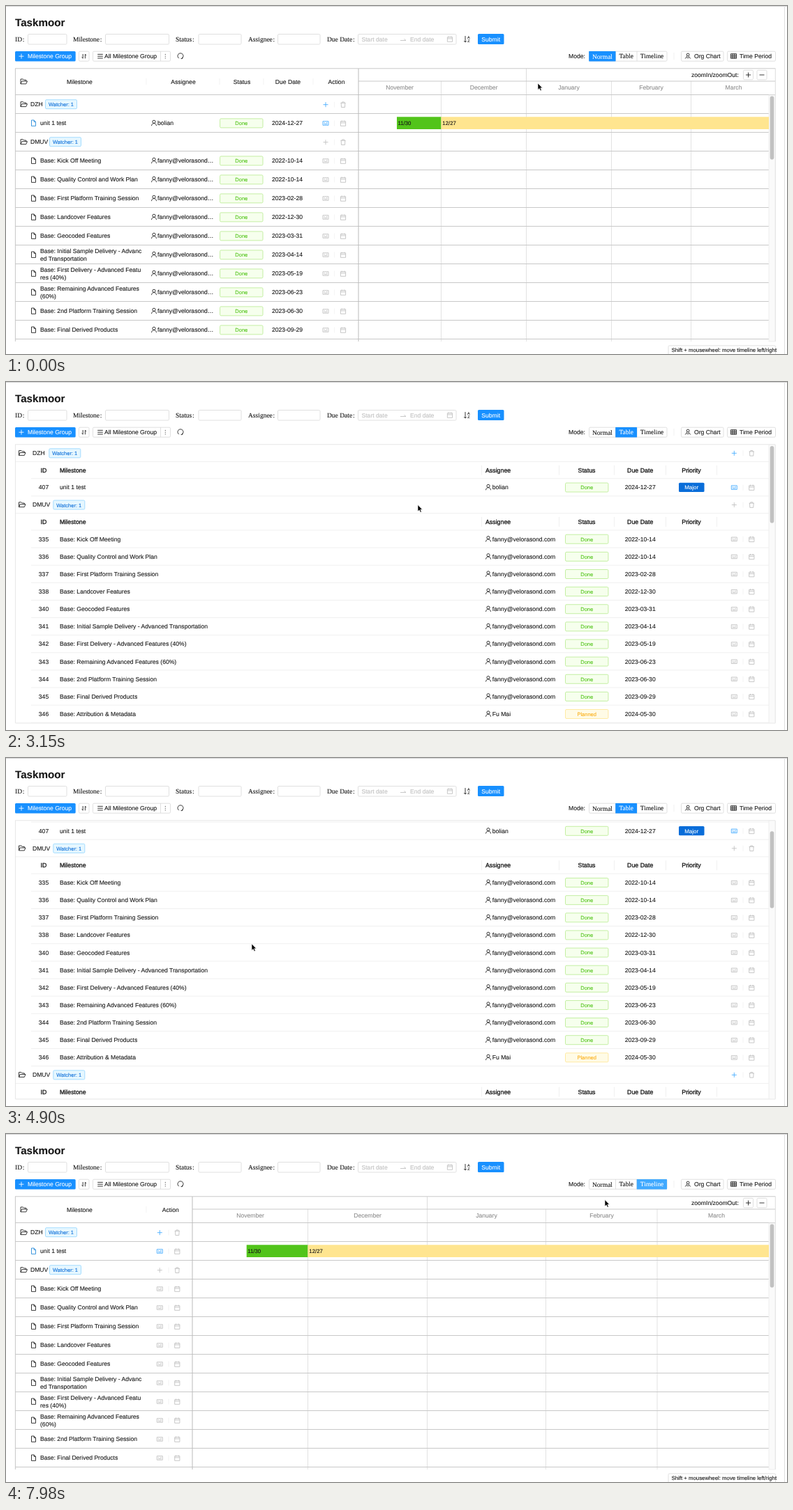
Recreate the animation shown at these times as an HTML page. Size 1119x500 px, loop 8 s.

```html
<!DOCTYPE html>
<html lang="en">
<head>
<meta charset="utf-8">
<title>Milestones</title>
<style>
html, body { margin: 0; width: 100%; height: 100%; overflow: hidden; background: #fff; }
svg { display: block; width: 1119px; height: 500px; font-family: "Liberation Sans", Arial, sans-serif; text-rendering: geometricPrecision; }
.serif { font-family: "Liberation Serif", "Times New Roman", serif; }
.icon { fill: none; stroke-width: .85; stroke-linejoin: round; }
</style>
</head>
<body>
<svg id="stage" viewBox="0 0 1119 500" xmlns="http://www.w3.org/2000/svg"></svg>
<script>
const LOOP = 8000, STEP = 70;
const INK = '#161616', GRAY = '#bfbfbf', BLUE = '#1890ff', SKY = '#40a9ff', RULE = '#c8c8c8', PALE = '#f0f0f0', BOX = '#d9d9d9';
const USER = 'bolian', MAIL = 'fanny@velorasond';

const ICONS = {
  user: 'M-2.1-1.9a2.1 2.1 0 1 0 4.2 0a2.1 2.1 0 1 0-4.2 0M-3.5 4C-3.2 1.6-1.8.4 0 .4S3.2 1.6 3.5 4',
  folder: 'M-4.5 3.4V-3.5H-1L.2-2.2H3.3V-.5M-4.5 3.4L-2.8-.5H5L3.3 3.4Z',
  file: 'M-3-4.2H.6L3-1.8V4.2H-3ZM.6-4.2V-1.8H3',
  plus: 'M-3.5 0H3.5M0-3.5V3.5',
  minus: 'M-3.5 0H3.5',
  trash: 'M-3.7-2.4H3.7M-1.5-2.4V-3.8H1.5V-2.4M-2.8-2.4L-2.5 3.8H2.5L2.8-2.4',
  card: 'M-4-2.8H4V2.8H-4ZM-2.5-.8H-1M.5-.8H2.5M-2.5 1.1H2.5',
  cal: 'M-3.6-2.8H3.6V3.8H-3.6ZM-3.6-.6H3.6M-1.8-4V-2M1.8-4V-2',
  sort: 'M-1.6-3.2V3L-3.3 1.3M1.6 3.2V-3L3.3-1.3',
  list: 'M-3.8-2.8H3.8M-3.8 0H3.8M-3.8 2.8H3.8',
  dots: 'M0-3.2V-2.2M0-.5V.5M0 2.2V3.2',
  reload: 'M-2.2 3.2A4 4 0 1 1 2.2 3.2M.6 3.6H2.6V1.7',
  grid: 'M-4-3.3H4V3.3H-4ZM-4-1H4M-4 1.2H4M-1.4-3.3V3.3M1.4-3.3V3.3',
  org: 'M-1.8-2a1.9 1.9 0 1 0 3.8 0a1.9 1.9 0 1 0-3.8 0M-3.8 3.6L-.8-.4M.8 0L3.8 3.6M-1.5 2.4H1.5',
  arrow: 'M-4 1.5H4L1.5-.6'
};

// y is the middle of the line; bold is the width of a thin outline
const text = (x, y, s, { size = 8.6, fill = INK, at = 'start', bold = .1, more = '' } = {}) =>
  `<text x="${x}" y="${y + size * .37}" font-size="${size}" fill="${fill}" stroke="${fill}" stroke-width="${bold}" text-anchor="${at}" ${more}>${s.replace(/&/g, '&amp;')}</text>`;
const mid = (x, y, s, o = {}) => text(x, y, s, { ...o, at: 'middle' });
const serif = (x, y, s, o = {}) => text(x, y, s, { size: 9.5, ...o, more: 'class="serif"' });
const rect = (x, y, w, h, fill = '#fff', stroke = 'none', r = 1.5) =>
  `<rect x="${x}" y="${y}" width="${w}" height="${h}" rx="${r}" fill="${fill}" stroke="${stroke}" stroke-width=".8"/>`;
const line = (x1, y1, x2, y2, c = RULE, w = 1) =>
  `<path d="M${x1} ${y1}L${x2} ${y2}" stroke="${c}" stroke-width="${w}"/>`;
const icon = (name, x, y, c = INK) =>
  `<path class="icon" d="${ICONS[name]}" stroke="${c}" transform="translate(${x} ${y})"/>`;

const TAGS = {
  'Done': ['#f6ffed', '#b7eb8f', '#52c41a'],
  'Planned': ['#fffbe6', '#ffe58f', '#faad14'],
  'In Progress': ['#e6f7ff', '#91d5ff', BLUE]
};
const tag = (cx, y, s) => {
  const [bg, edge, ink] = TAGS[s];
  return rect(cx - 30.7, y - 6.3, 61.4, 13, bg, edge) + mid(cx, y + .3, s, { size: 7.5, fill: ink });
};
const watcher = (x, y) => rect(x, y - 6.5, 45, 13, '#e6f7ff', '#91d5ff') +
  mid(x + 22.5, y + .2, 'Watcher: 1', { size: 7.5, fill: '#096dd9' });

const BASE = [
  ['335', 'Kick Off Meeting', '2022-10-14'],
  ['336', 'Quality Control and Work Plan', '2022-10-14'],
  ['337', 'First Platform Training Session', '2023-02-28'],
  ['338', 'Landcover Features', '2022-12-30'],
  ['340', 'Geocoded Features', '2023-03-31'],
  ['341', 'Initial Sample Delivery - Advanc|ed Transportation', '2023-04-14'],
  ['342', 'First Delivery - Advanced Featu|res (40%)', '2023-05-19'],
  ['343', 'Remaining Advanced Features |(60%)', '2023-06-23'],
  ['344', '2nd Platform Training Session', '2023-06-30'],
  ['345', 'Final Derived Products', '2023-09-29'],
  ['346', 'Attribution & Metadata', '2024-05-30']
];

function page() {
  let s = line(0, .3, 1119, .3, '#bdbdbd', .8) + line(1115.5, 0, 1115.5, 500, '#e0e0e0', 1);
  s += text(13, 23, 'Taskmoor', { size: 15.2, more: 'font-weight="700"' });
  for (const [x, label, l, r] of [[13, 'ID', 31.5, 87], [96, 'Milestone', 142.5, 233.5], [243, 'Status', 276, 337], [347, 'Assignee', 389.5, 450], [460, 'Due Date', 504.5, 645]])
    s += serif(x, 47.5, label + '\u200a:') + rect(l, 40.5, r - l, 14.5, '#fff', BOX);
  s += text(509.5, 47.5, 'Start date', { fill: GRAY }) + icon('arrow', 569, 48, GRAY) +
    text(579, 47.5, 'End date', { fill: GRAY }) + icon('cal', 636, 47.5, GRAY);
  s += `<path class="icon" d="M658 43V52L656.3 50.2M658 52L659.5 50.2" stroke="${INK}"/>` +
    mid(662.8, 44.7, 'A', { size: 5.4 }) + mid(662.8, 50, 'Z', { size: 5.4 });
  s += rect(676, 40, 37.5, 15, BLUE) + mid(694.7, 47.5, 'Submit', { fill: '#fff' });
  s += rect(13, 65, 86.7, 14.5, BLUE) + icon('plus', 22, 72.2, '#fff') + text(31, 72.2, 'Milestone Group', { fill: '#fff' });
  s += rect(104.5, 65.2, 14.5, 14, '#fff', BOX) + icon('sort', 111.8, 72.2);
  s += rect(124.5, 65.2, 111, 14, '#fff', BOX) + line(221.5, 65, 221.5, 79, BOX, .8) + icon('list', 135, 72.2) +
    text(141, 72.2, 'All Milestone Group') + icon('dots', 228.3, 72.2) + icon('reload', 250, 72);
  s += text(806, 72.2, 'Mode:') + line(957, 67, 957, 77, '#eee', .8);
  s += rect(967.5, 65.2, 60.5, 14, '#fff', BOX) + icon('org', 977, 72) + text(986, 72.2, 'Org Chart');
  s += rect(1033.5, 65.2, 69, 14, '#fff', BOX) + icon('grid', 1042.5, 72) + text(1051, 72.2, 'Time Period');
  return s;
}

function actions(x, y, group, hot, due) {
  return icon(group ? 'plus' : 'card', x, y, hot ? SKY : GRAY) + line(x + 12.7, y - 4, x + 12.7, y + 4, PALE, .8) +
    icon(group ? 'trash' : 'cal', x + 25, y, due ? '#d4a017' : GRAY);
}

function chart({ split, act, months, names, green, people }) {
  const rowY = i => 141.2 + 27 * i;
  let s = '';
  for (const x of months) s += line(x, 108, x, 482, '#e2e2e2');
  s += line(months[1], 90, months[1], 108, '#dcdcdc');
  for (let i = 0; i < 14; i++) s += line(13, 127.5 + 27 * i, 1102, 127.5 + 27 * i);
  s += line(13, 89.8, 1102.5, 89.8) + line(split, 108, 1102, 108);
  s += line(13.4, 90, 13.4, 482) + line(split, 90, split, 482, '#bbb') + line(1102.3, 90, 1102.3, 482, '#dcdcdc');
  s += rect(1093, 128, 9, 354, '#fafafa', '#ebebeb', 0) + rect(1094.7, 129.5, 5.6, 91, '#c1c1c1', 'none', 2.8);

  s += icon('folder', 25.5, 108.5) + mid(105.5, 108.7, 'Milestone') + mid(act + 15.5, 108.7, 'Action');
  for (const x of people ? [201, 306, 369, 440] : [201]) s += line(x, 104, x, 113, PALE, .8);
  if (people) s += mid(254, 108.7, 'Assignee') + mid(338, 108.7, 'Status') + mid(404, 108.7, 'Due Date');
  ['November', 'December', 'January', 'February', 'March'].forEach((m, i) => s += mid(names[i], 117.3, m, { fill: '#8c8c8c' }));
  s += text(982, 99, 'zoomIn/zoomOut:');
  for (const [x, n] of [[1056.5, 'plus'], [1076, 'minus']]) s += rect(x, 92.3, 14, 13.5, '#fff', BOX) + icon(n, x + 7, 99);

  const group = (i, name, x, hot) => icon('folder', 25.5, rowY(i)) + text(35, rowY(i), name) + watcher(x, rowY(i)) + actions(act, rowY(i) + .5, true, hot);
  const row = (i, lines, who, date, hot) => {
    const y = rowY(i);
    let r = icon('file', 39.5, y, hot ? '#1c86d8' : INK);
    lines.forEach((l, k) => r += text(49, y + (lines.length > 1 ? k * 11 - 5.5 : 0), l));
    if (people) r += icon('user', 212, y) + text(217, y, who) + tag(337.3, y, 'Done') + mid(403, y, date);
    return r + actions(act, y + .3, false, hot);
  };
  s += group(0, 'DZH', 56.5, true) + row(1, ['unit 1 test'], USER, '2024-12-27', true) + group(2, 'DMUV', 62.5, false);
  BASE.slice(0, 10).forEach(([, n, d], i) => s += row(i + 3, ('Base: ' + n).split('|'), MAIL + '…', d, false));

  const bar = months[0];
  s += rect(green, 159.3, bar - green, 17.7, '#52c41a', 'none', 0) + rect(bar, 159.3, 1093 - bar, 17.7, '#ffe58f', 'none', 0);
  s += text(green + 1.5, 168.2, '11/30', { size: 7.8 }) + text(bar + 1.8, 168.2, '12/27', { size: 7.8 });
  s += rect(949, 488, 153.5, 16, '#fff', BOX) + text(953.5, 494.2, 'Shift + mousewheel: move timeline left/right', { size: 7.8 });
  return s;
}

function table() {
  let s = '', y = 86.6;
  const head = { size: 8.8, bold: .3 };
  const group = (name, x, hot) => {
    const c = y + 12.4;
    s += icon('folder', 23, c) + text(38, c, name) + watcher(x, c + .3) + actions(1043.3, c + .3, true, hot);
    y += 24.8;
    s += line(13, y, 1093, y, PALE);
    const h = y + 12.3;
    s += mid(54, h, 'ID', head) + text(77, h, 'Milestone', head) + text(687, h, 'Assignee', head) +
      mid(832, h, 'Status', head) + mid(908.7, h, 'Due Date', head) + mid(982, h, 'Priority', head);
    for (const v of [681.5, 792.5, 871.5, 945.5, 1018.5]) s += line(v, h - 7, v, h + 7, PALE);
    y += 24.3;
    s += line(36, y, 1093, y, PALE);
  };
  const row = (id, name, who, status, date, { ink = INK, hot, due, major } = {}) => {
    const c = y + 12.6;
    s += mid(54, c, id) + text(77, c, name, { fill: ink }) + icon('user', 691, c) + text(696.8, c, who) +
      tag(832.2, c, status) + mid(908.7, c, date) + actions(1043.3, c + .3, false, hot, due);
    if (major) s += rect(964, c - 6.5, 36.5, 13.2, '#096dd9') + mid(982.2, c + .2, 'Major', { size: 8, fill: '#fff' });
    y += 25.13;
    s += line(36, y, 1093, y, PALE);
  };
  group('DZH', 61.8, true);
  row('407', 'unit 1 test', USER, 'Done', '2024-12-27', { hot: true, major: true });
  group('DMUV', 67.8, false);
  BASE.forEach(([id, n, d], i) => row(id, 'Base: ' + n.replace('|', ''), i < 10 ? MAIL + '.com' : 'Fu Mai', i < 10 ? 'Done' : 'Planned', d));
  group('DMUV', 67.8, true);
  const late = { ink: '#e0282e', hot: true, due: true };
  row('381', 'test', USER, 'Planned', '2023-11-23', late);
  row('382', 'test2', USER, 'In Progress', '2023-11-15', late);
  row('383', 'test3', USER, 'Planned', '2023-11-23', late);
  return `<g clip-path="url(#pane)"><g id="rows">${s}</g></g>` +
    `<path d="M13.4 90V490H1102.3V90" fill="none" stroke="#e6e6e6"/>` + line(13, 89.8, 1102, 89.8, '#e6e6e6') +
    rect(1093, 90, 9, 400, '#fafafa', '#ebebeb', 0) + `<g id="thumb">${rect(1094.7, 92.8, 5.6, 110.5, '#c1c1c1', 'none', 2.8)}</g>`;
}

// name, left, width, text size
const MODES = [['Normal', 835.5, 38, 9.5], ['Table', 873.5, 30.5, 9.3], ['Timeline', 904, 43, 9.35]];
const stage = document.getElementById('stage');
stage.innerHTML = '<defs><clipPath id="pane"><rect x="13" y="90" width="1080" height="399.6"/></clipPath></defs>' +
  page() + '<g id="modes"></g>' +
  `<g class="view">${chart({ split: 505, act: 458, months: [623.5, 745.5, 867.5, 981.5], names: [564, 684.5, 806.5, 924.5, 1042.5], green: 560, people: true })}</g>` +
  `<g class="view">${table()}</g>` +
  `<g class="view">${chart({ split: 267, act: 220.3, months: [432.5, 603.5, 773.5, 933], names: [350, 518, 688.5, 853.5, 1018], green: 344.7, people: false })}</g>` +
  `<circle id="ring" fill="none" stroke="#555" stroke-width="1"/>
  <path id="arrow" d="M0 0V9.4L2.2 7.4L3.7 10.8L5.3 10.1L3.8 6.8H6.6Z" fill="#000" stroke="#fff" stroke-width=".6"/>
  <path id="hand" d="M-1 .3Q0-.8 1 .3V3.6L4 4.2Q5.2 4.6 5 6.2L4.2 10H0L-2.8 6.4Q-3 5.2-2 5.2L-1 6.2Z" fill="#fff" stroke="#000" stroke-width=".8"/>`;

const $ = id => document.getElementById(id);
const views = [...document.querySelectorAll('.view')];

// time, x, y
const PATH = [[0, 762, 111], [70, 770, 108], [140, 800, 92], [210, 845, 62], [280, 862, 54], [350, 851, 71], [770, 851, 71],
  [910, 887, 71], [980, 887, 71], [1190, 889, 71], [2730, 889, 71], [2800, 872, 80], [3010, 700, 150], [3290, 480, 203],
  [3570, 372, 212], [3640, 366, 222], [3850, 352, 267], [5180, 352, 267], [5250, 420, 245], [5390, 760, 130], [5530, 978, 82],
  [5740, 974, 95], [5950, 945, 70], [6090, 926, 57], [6370, 924, 71], [7490, 924, 71], [7560, 920, 66], [7700, 900, 58], [7840, 872, 80], [7980, 858, 94.5]];
// time, scroll offset
const SCROLL = [[3990, -3], [4060, 0], [4130, 5], [4340, 24.7], [4480, 27], [4690, 27], [4760, 28.5], [4900, 43.7], [5180, 102], [5250, 106], [5390, 109]];
// time, length
const CLICKS = [[1960, 560], [7280, 210]];

function sample(keys, t) {
  const i = keys.findIndex(k => k[0] > t);
  if (i < 0) return keys[keys.length - 1].slice(1);
  if (i === 0) return keys[0].slice(1);
  const a = keys[i - 1], b = keys[i], p = (t - a[0]) / (b[0] - a[0]);
  return a.slice(1).map((v, k) => v + (b[k + 1] - v) * p);
}

function modes(active, x, y) {
  let s = rect(835.5, 65.2, 111.5, 14, '#fff', BOX) + line(873.5, 65, 873.5, 79, BOX, .8) + line(904, 65, 904, 79, BOX, .8);
  MODES.forEach(([name, l, w, size], i) => {
    const over = x > l && x < l + w && y > 65 && y < 80;
    if (i === active) s += rect(l - .3, 65, w + .3, 14.5, i === 2 ? SKY : BLUE, 'none', .5);
    s += serif(l + w / 2, 72, name, { size, at: 'middle', fill: i === active ? '#fff' : over ? SKY : INK });
  });
  return s;
}

function draw(t) {
  const active = t < 2800 ? 0 : t < 7560 ? 1 : 2;
  views.forEach((v, i) => v.style.display = i === active ? '' : 'none');
  const [x, y] = sample(PATH, t), [scroll] = sample(SCROLL, t);
  $('modes').innerHTML = modes(active, x, y);
  $('rows').setAttribute('transform', `translate(0 ${-scroll})`);
  $('thumb').setAttribute('transform', `translate(0 ${scroll * .284})`);
  const hand = y > 65 && y < 79 && (x > 835 && x < 947 || x > 967 && x < 1028);
  for (const [id, on] of [['hand', hand], ['arrow', !hand]]) {
    $(id).style.display = on ? '' : 'none';
    $(id).setAttribute('transform', `translate(${x} ${y})`);
  }
  const hit = CLICKS.find(([at, len]) => t >= at && t < at + len);
  const p = hit ? (t - hit[0]) / hit[1] : 1;
  const ring = { cx: x, cy: y, r: 8 + 11.5 * p, opacity: .5 * (1 - p) };
  for (const k in ring) $('ring').setAttribute(k, ring[k]);
}

const start = performance.now();
let shown = -1;
function tick() {
  const t = Math.floor((performance.now() - start) % LOOP / STEP) * STEP;
  if (t !== shown) draw(shown = t);
  requestAnimationFrame(tick);
}
tick();
</script>
</body>
</html>
```
